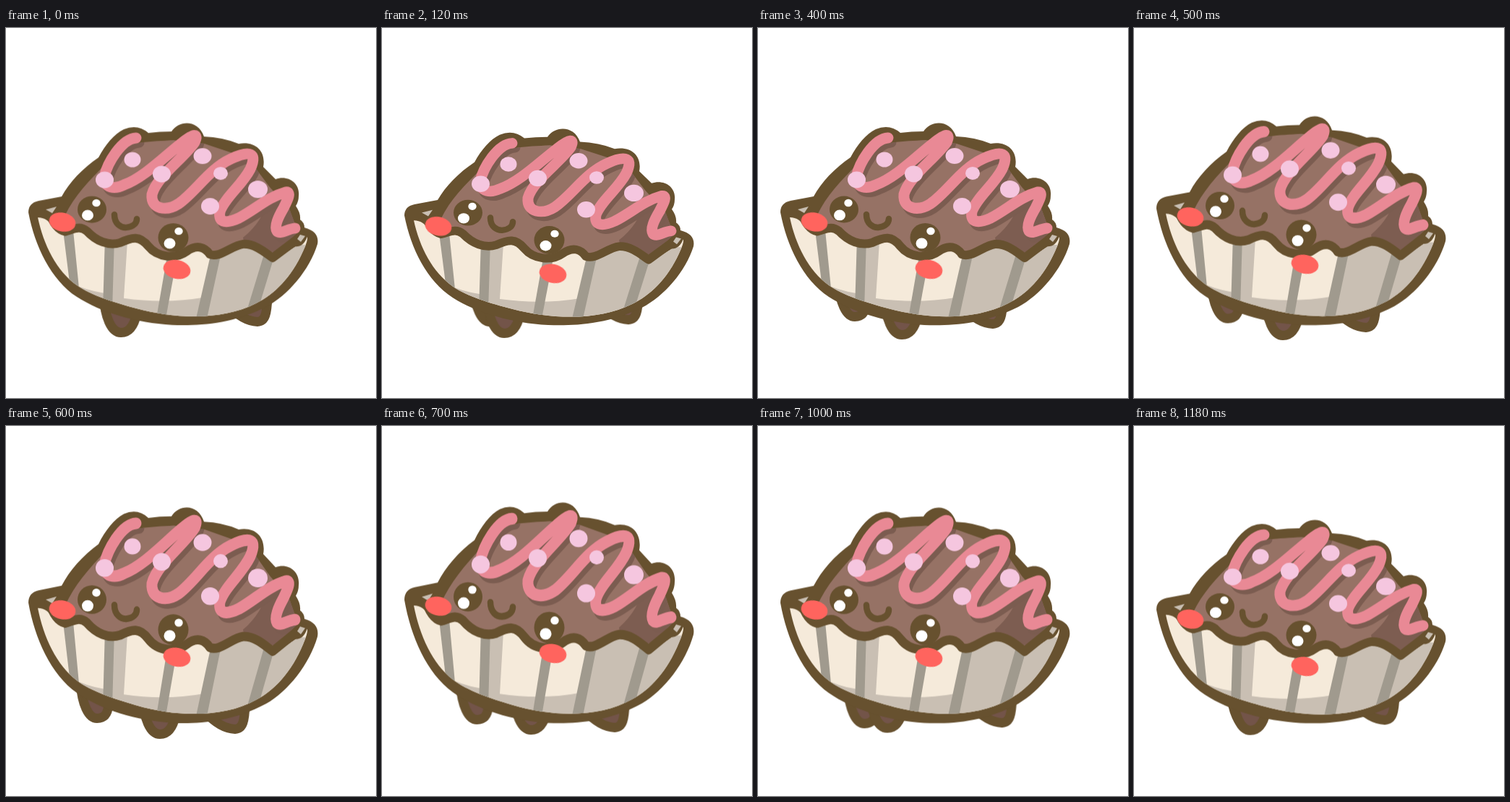
Write an HTML page without scripts that moves like this. It is 512x512 px and loops after 1200 ms.

```html
<!DOCTYPE html>
<html lang="en">
<head>
<meta charset="utf-8">
<title>Walking chocolate</title>
<style>
  html, body { margin: 0; width: 100%; height: 100%; overflow: hidden; background: #fff; }
  svg { display: block; width: 100vw; height: 100vh; }

  .outline { fill: #67512f; }
  .line { fill: none; stroke: #67512f; stroke-linecap: round; stroke-linejoin: round; }
  .foot path { fill: #735449; stroke: #67512f; stroke-width: 13; stroke-linejoin: round; }
  .shade { fill: #c9bfb3; }
  .pleats { fill: #a09a8e; }
  .drizzle { fill: none; stroke-width: 15; stroke-linecap: round; stroke-linejoin: round; }
  .sprinkles { fill: #f5c6df; }
  .glints { fill: #fff; }
  .blush { fill: #ff645e; }

  /* Body and cheeks bob together, stretched to squashed and back */
  .body, .blush { animation: 600ms cubic-bezier(.364, 0, .636, 1) -400ms infinite alternate; }
  .body { transform-origin: 0 412px; animation-name: squash; }
  .blush { animation-name: bob; }
  @keyframes squash { from { transform: scaleY(1.1); } to { transform: scaleY(.966); } }
  @keyframes bob { from { transform: translateY(-21px); } to { transform: translateY(7px); } }

  .foot { animation: 1200ms linear infinite; }
  .front { animation-name: front; }
  .left { animation-name: left; }
  .right { animation-name: right; }
  @keyframes front {
    0%, 100% { transform: translate(0, 0); }
    21.67% { transform: translate(22px, 2px); }
    33.33% { transform: translate(40px, 3px); }
    50% { transform: translate(54px, 5px); }
    70% { transform: translate(38px, -9px); }
    83.33% { transform: translate(20px, -3.5px); }
  }
  @keyframes left {
    0%, 100% { transform: translate(32px, 11px); }
    21.67% { transform: translate(14px, -8px); }
    33.33% { transform: translate(8px, -5px); }
    50% { transform: translate(0, 0); }
  }
  @keyframes right {
    0%, 100% { transform: translate(31px, -13px); }
    21.67% { transform: translate(16px, -19px); }
    33.33% { transform: translate(8px, -10px); }
    50% { transform: translate(0, 0); }
  }
</style>
</head>
<body>
<svg viewBox="0 0 512 512">
  <defs>
    <path id="cup" d="M44 262 Q58 262 66 277 Q80 284 104 279 Q125 300 150 300 Q175 286 195 304 Q225 326 250 312 Q268 300 285 318 Q305 316 328 303 Q348 302 369 323 L400 303 L417 289 Q418 294 411 309 C395 345 371 369 346 381 C300 405 235 403 180 388 C150 380 118 370 98 356 C70 336 52 300 44 262Z"/>
    <clipPath id="cupClip"><use href="#cup"/></clipPath>
    <path id="dome" d="M78 268 C88 242 106 220 130 196 L152 171 C170 157 200 157 232 155 L275 160 L335 180 L365 220 L392 250 L404 282 L370 314 Q340 292 315 305 Q290 320 270 305 Q235 322 205 311 Q185 282 160 297 Q130 302 110 277 Q90 278 78 268Z"/>
    <clipPath id="domeClip"><use href="#dome"/></clipPath>
    <path id="swirl" d="M180 152 C160 153 140 187 136 206 C135 222 151 223 163 217 C191 207 221 176 242 160 C260 145 267 145 261 158 C246 180 209 205 202 230 C200 251 222 254 239 243 C263 226 281 195 311 181 C338 168 348 173 338 195 C326 218 303 234 296 254 C293 271 307 270 322 263 C345 251 362 234 387 227 C396 226 389 239 384 249 C377 261 371 274 375 281 C380 286 389 278 400 277"/>
  </defs>

  <g class="foot left"><path d="M103 355 C105 385 114 404.500 126 404.500 C138 404.500 141 396 142 385 V355Z"/></g>
  <g class="foot right"><path d="M275 395 C290 412 305 419 317 419.500 C328 419 330 408 331 385 V372Z"/></g>
  <g class="foot front"><path d="M135.500 370 C136 400 146 421.500 159 421.500 C174 421.500 179 404 181 394 V370Z"/></g>

  <g class="body">
    <path class="outline" d="M31 255 Q31 242 45 239 L77 233 C88 213 106 194 128 179 C137 162 150 146 163 140 Q182 132 197 145 Q212 143 229 143 C239 127 266 126 274 150 Q300 151 322 160 C346 156 360 171 356 192 Q365 201 373 209 C390 203 407 214 405 232 Q405 240 401 246 Q408 256 407 265 Q413 269 413 276 C428 280 433 288 431 299 C420 335 390 370 360 386 C310 411 265 412 230 411 C180 408 132 394 98 372 C62 348 40 302 31 255Z"/>

    <use href="#cup" fill="#f5eada"/>
    <g clip-path="url(#cupClip)">
      <path class="shade" d="M291 300 H430 V410 H80 L88 352 Q110 363 136 367 L149 295 H168 L163 374 Q220 382 273 373Z"/>
      <g class="pleats">
        <path d="M79 280 H93 L101 360 H89Z"/>
        <path d="M137 290 H150 L147 390 H134Z"/>
        <path d="M224 310 H238 L221 402 H208Z"/>
        <path d="M284 310 H298 L278 402 H263Z"/>
        <path d="M358 310 H373 L348 392 H333Z"/>
      </g>
    </g>

    <use href="#dome" fill="#967265"/>
    <g clip-path="url(#domeClip)">
      <path fill="#7d5d51" d="M362 238 Q355 268 328 290 L332 310 H380 L420 280 L395 240Z"/>
      <use href="#swirl" class="drizzle" stroke="#7b5c50" x="4" y="6"/>
    </g>
    <path class="line" stroke-width="12" d="M59 252 Q67 278 82 281.500 C95 278 102 273 112 281 C125 295 142 302 158 297 C175 289 185 287 197 302 C210 318 235 320 250 309 C264 299 275 303 282 313 C295 319 312 301 328 299 C345 298 360 312 369 318 L398 296 Q407 298 411 287"/>
    <path class="shade" d="M55 251 L70 247 L64 256Z M403 292 L407 286 L414 288 L408 296Z"/>
    <use href="#swirl" class="drizzle" stroke="#e98995"/>

    <g class="sprinkles">
      <ellipse cx="136.500" cy="210" rx="12.500" ry="11.500"/>
      <ellipse cx="175" cy="182" rx="11.500" ry="10.500"/>
      <ellipse cx="215.500" cy="202" rx="12.500" ry="11.500"/>
      <ellipse cx="272" cy="177" rx="12.500" ry="11"/>
      <ellipse cx="297" cy="201" rx="10" ry="9"/>
      <ellipse cx="282.500" cy="246.500" rx="12.500" ry="11.500"/>
      <ellipse cx="348.500" cy="223" rx="13.500" ry="12"/>
    </g>

    <g class="outline">
      <ellipse cx="119" cy="251" rx="20" ry="18.500"/>
      <ellipse cx="231.500" cy="290" rx="21" ry="20"/>
    </g>
    <g class="glints">
      <ellipse cx="125" cy="242" rx="5.700" ry="5.200"/>
      <ellipse cx="113" cy="259" rx="8" ry="7.400"/>
      <ellipse cx="239" cy="281" rx="5.700" ry="5.200"/>
      <ellipse cx="226.500" cy="298" rx="8" ry="7.400"/>
    </g>
    <path class="line" stroke-width="8.500" d="M150 258 C150 271 159 276 166 276 C176 275 181 270 181 264"/>
  </g>

  <g class="blush">
    <ellipse rx="18.500" ry="13" transform="translate(78 268.500) rotate(12)"/>
    <ellipse rx="19" ry="13" transform="translate(236.500 334) rotate(12)"/>
  </g>
</svg>
</body>
</html>
```
